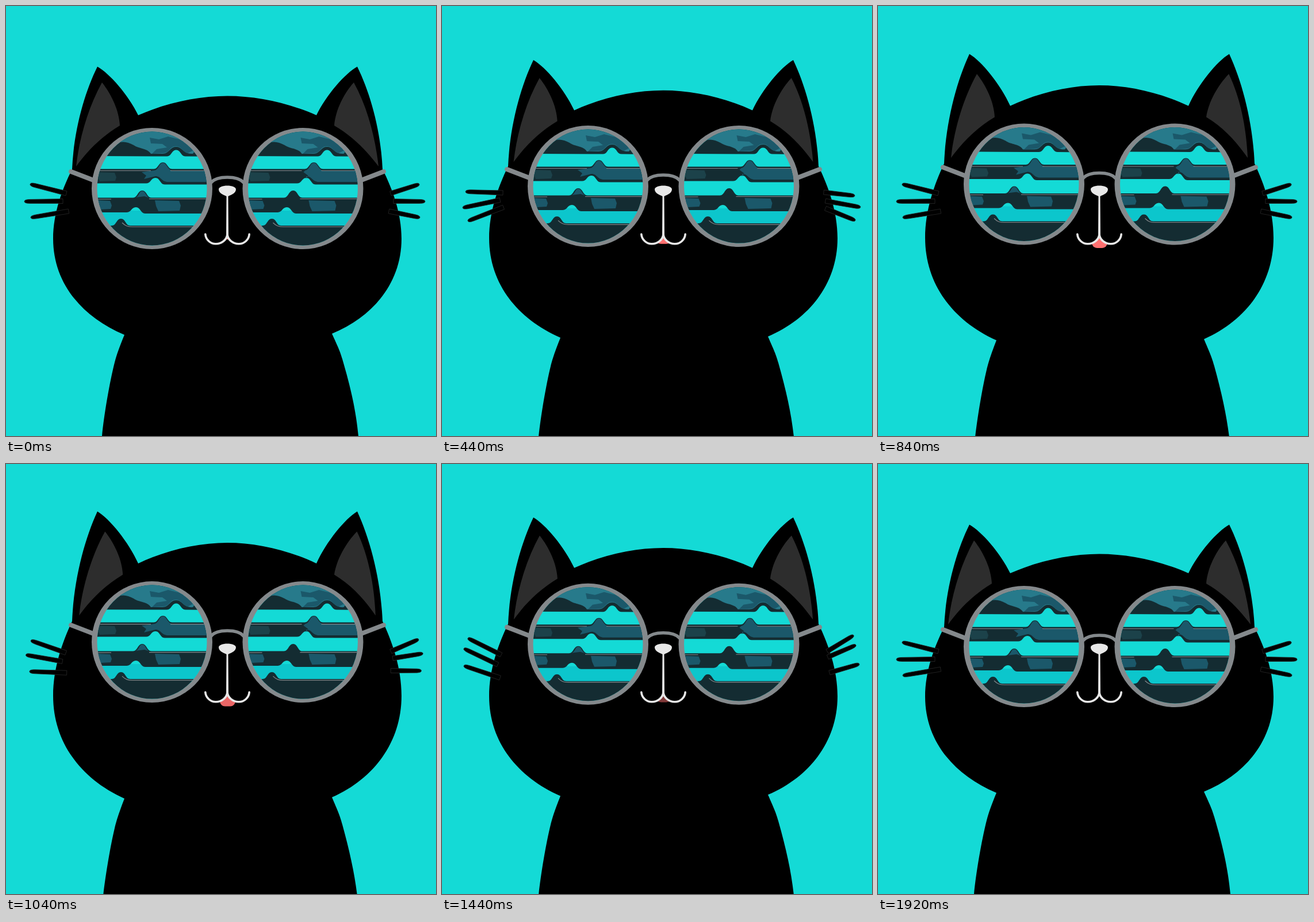
These frames come from a looping animation (748x748 px, 1960 ms). An HTML page:

```html
<!DOCTYPE html>
<html lang="en">
<head>
<meta charset="utf-8">
<title>Cool cat</title>
<style>
  html, body { margin: 0; width: 100%; height: 100%; overflow: hidden; background: #14dad6; }
  svg { display: block; width: 100vw; height: 100vh; }
</style>
</head>
<body>
<svg viewBox="0 0 748 748">
  <defs>
    <clipPath id="lens"><ellipse cx="254" cy="317.500" rx="95.500" ry="99"/></clipPath>
    <clipPath id="mouth"><path d="M385 398C384 408 375 414 364 414V430H406V414C395 414 386 408 385 398Z"/></clipPath>
  </defs>
  <rect width="748" height="748" fill="#14dad6"/>
  <path id="body" d="M159 105.500C180 117 213 155 230 190C280 168 335 156.500 385 156.500S490 168 540 190
    C557 155 590 117 611 105.500C633 150 652 215 655 284C672 318 688 360 688 405
    C688 480 640 540 567 570C577 592 581 600 585 614C600 665 609 705 613 748L615 770H165
    L167 748C170 715 180 655 189 620C193 605 197 594 206 572C130 540 82 480 82 405
    C82 360 98 318 115 284C118 215 137 150 159 105.500Z"/>
  <g fill="#2d2d2d">
    <path id="earLeft" d="M167 133C183 153 197 182 198 208C168 226 143 250 122 279C127 233 142 178 167 133Z"/>
    <path id="earRight" d="M605 133C587 153 573 182 571 208C602 226 626 250 648 279C643 233 630 178 605 133Z"/>
  </g>
  <g id="whiskers" stroke="#2a2a2a" stroke-width=".8"></g>
  <g id="glasses">
    <g fill="none" stroke="#84898c" stroke-linecap="round">
      <path d="M113 288L152 303M657 288L618 303" stroke-width="8"/>
      <path d="M357 307C363 300 373 298 385 298S407 300 413 307" stroke-width="5.500"/>
    </g>
    <g id="lenses"></g>
  </g>
  <g clip-path="url(#mouth)">
    <rect id="tongue" x="372" y="376" width="27" height="30" rx="9" fill="#ff7070"/>
  </g>
  <g fill="#e8e8e8">
    <path d="M370 319C370 315 377 312.500 385 312.500S400 315 400 319C400 325 393 328 386.500 331L387 398H383L383.500 331C377 328 370 325 370 319Z"/>
    <path d="M385 397C384 407 375 413.800 365 413.800C355 413.800 347.500 406 346.800 397M385 397C386 407 395 413.800 405 413.800C415 413.800 422.500 406 423.200 397"
      fill="none" stroke="#e8e8e8" stroke-width="3.600" stroke-linecap="round"/>
  </g>
</svg>
<script>
const LOOP = 1960, STEP = 40, HALF = 960;
const DARK = '#142c32', TEAL = '#1b586a', DIM = '#1c424a', LIGHT = '#277a8b', GREY = '#84898c';
const byId = id => document.getElementById(id);

// Horizontal run that rises into a rounded hump at x; dir -1 draws right to left.
const hump = (x, y, h, w = 16, dir = 1, endY = y) => {
  const a = x - w * dir, b = x + w * dir, k = w * .5 * dir;
  return `L${a} ${y}C${x - k} ${y} ${x - k} ${y - h} ${x} ${y - h}S${x + k} ${endY} ${b} ${endY}`;
};
const shape = (d, fill) => `<path d="${d}" fill="${fill}"/>`;
const line = (d, color, width) => `<path d="${d}" fill="none" stroke="${color}" stroke-width="${width}"/>`;
const patch = (x1, x2, y1, y2, fill = TEAL) =>
  shape(`M${x1} ${y1}L${x2 - 3} ${y1 + 1}L${x2} ${y1 + 9}L${x2 - 2} ${y2}L${x1 + 6} ${y2 + 1}L${x1 + 2} ${y2 - 8}Z`, fill);

// A wave band: crest on top, the next gap's crest cut into its underside.
const band = (top, topX, topH, bottom, lowX, lowH) =>
  shape(`M140 ${top}${hump(topX, top, topH)}L370 ${top}V${bottom}` +
    `${hump(lowX, bottom, lowH, 16, -1, bottom - 2)}L140 ${bottom - 2}Z`, DARK);

function lens({ dx, dimTo, tealFrom, leftTo, patchFrom, patchTo, crest }) {
  return `<g transform="translate(${dx} 0)">
    <ellipse cx="254" cy="317.500" rx="105" ry="105.500" fill="${GREY}"/>
    <g clip-path="url(#lens)">
      ${shape('M140 200H370V450H140Z', '#14dad6')}
      ${shape('M140 356H370V390H140Z', '#0cc6cc')}
      ${shape(`M140 200H370V262${hump(296, 261.5, 11, 16, -1)}L140 261Z`, DARK)}
      ${shape('M140 200H370L325 257C308 258 307 245 296 245C285 245 284 257 272 257H252C246 247 232 249 222 242C208 235 198 232 176 249Z', LIGHT)}
      ${shape('M250 229L266 232L282 227L318 236L328 250L316 256C307 254 305 244 296 244C284 244 285 256 272 256L254 257L262 249L280 246L272 240L252 239Z', TEAL)}
      ${band(283.5, 273, 11.5, 310.5, 260, 11.5)}
      ${patch(157, dimTo, 289, 304, DIM)}
      ${shape(`M${tealFrom} 289L258 286C266 285 266 273 273 273S280 285 291 287H370V306H282C270 306 270 296 260 296L${tealFrom + 4} 301L${tealFrom + 8} 295Z`, TEAL)}
      ${line('M160 286.500H252M286 286.500H351', GREY, 1.1)}
      ${band(333.5, 237, 12.5, 361, 226, 11)}
      ${patch(158, leftTo, 338, 353)}
      ${patch(patchFrom, patchTo, 338, 356)}
      ${shape('M225 333C232 332 231 322 237 322S243 332 250 334L241 331Z', crest)}
      ${line('M160 336H183M249 335.500H352', GREY, 1.1)}
      ${shape(`M140 382${hump(200, 382, 12)}L370 382V430H140Z`, DARK)}
      ${line('M202 377C208 383 212 384 220 384H325', GREY, 1.2)}
    </g></g>`;
}
byId('lenses').innerHTML =
  lens({ dx: 0, dimTo: 192, tealFrom: 236, leftTo: 184, patchFrom: 259, patchTo: 304, crest: TEAL }) +
  lens({ dx: 262.5, dimTo: 197, tealFrom: 255, leftTo: 187, patchFrom: 264, patchTo: 312, crest: DARK });

// Each whisker: root x, y, tip x, y at rest, swung down and swung up.
const whiskers = [
  { rest: [105, 326, 42, 310], down: [106, 325, 41, 323], up: [103, 332, 45, 303] },
  { rest: [99, 339.5, 32, 340], down: [101, 337.5, 36, 351], up: [97, 349, 38, 321] },
  { rest: [109, 357, 43, 368], down: [107, 350, 45, 374], up: [101, 372, 38, 351] },
  { rest: [669, 326, 719, 310], down: [664, 324, 718, 330], up: [670, 326, 716, 298] },
  { rest: [674, 339.5, 729, 340], down: [667, 339, 728, 350], up: [671, 336, 720, 315] },
  { rest: [666, 357, 720, 368], down: [667, 352, 719, 373], up: [674, 363, 726, 348] }
];
for (const w of whiskers) {
  w.path = document.createElementNS('http://www.w3.org/2000/svg', 'path');
  byId('whiskers').append(w.path);
}

function whiskerPath([x1, y1, x2, y2]) {
  const len = Math.hypot(x2 - x1, y2 - y1), ux = (x2 - x1) / len, uy = (y2 - y1) / len;
  const at = (along, side) =>
    `${(x1 + ux * along - uy * side).toFixed(2)} ${(y1 + uy * along + ux * side).toFixed(2)} `;
  return `M${at(0, 4)}L${at(len - 10, 3.5)}C${at(len - 4, 3.4)}${at(len, 2.6)}${at(len, 0)}` +
    `C${at(len, -2.6)}${at(len - 4, -3.4)}${at(len - 10, -3.5)}L${at(0, -4)}Z`;
}

const triangle = (t, start, end) =>
  Math.max(0, 1 - Math.abs((2 * t - start - end) / (end - start)));

function draw(t) {
  const rise = triangle(t, 0, 2 * HALF);
  byId('body').setAttribute('transform', `translate(0 431) scale(1 ${1 + .0773 * rise}) translate(0 -431)`);
  byId('earLeft').setAttribute('transform', `translate(${5.7 * rise} ${-16.8 * rise})`);
  const skew = -.08 * rise;
  byId('earRight').setAttribute('transform', `matrix(1 0 ${skew} 1 ${-208 * skew} ${-16.8 * rise})`);
  byId('glasses').setAttribute('transform', `translate(0 ${-8.6 * rise})`);
  byId('tongue').setAttribute('y', 376 + 17 * rise);
  byId('tongue').setAttribute('opacity', Math.min(1, Math.max(0, 2 - t / HALF)));

  const down = 1.05 * triangle(t, 0, 840), up = 1.125 * triangle(t, 840, 1920);
  for (const w of whiskers) {
    const pose = w.rest.map((v, i) => v + down * (w.down[i] - v) + up * (w.up[i] - v));
    w.path.setAttribute('d', whiskerPath(pose));
  }
}

const start = performance.now();
function tick() {
  const t = (performance.now() - start) % LOOP;
  draw(Math.floor(t / STEP) * STEP);
  requestAnimationFrame(tick);
}
tick();
</script>
</body>
</html>
```
